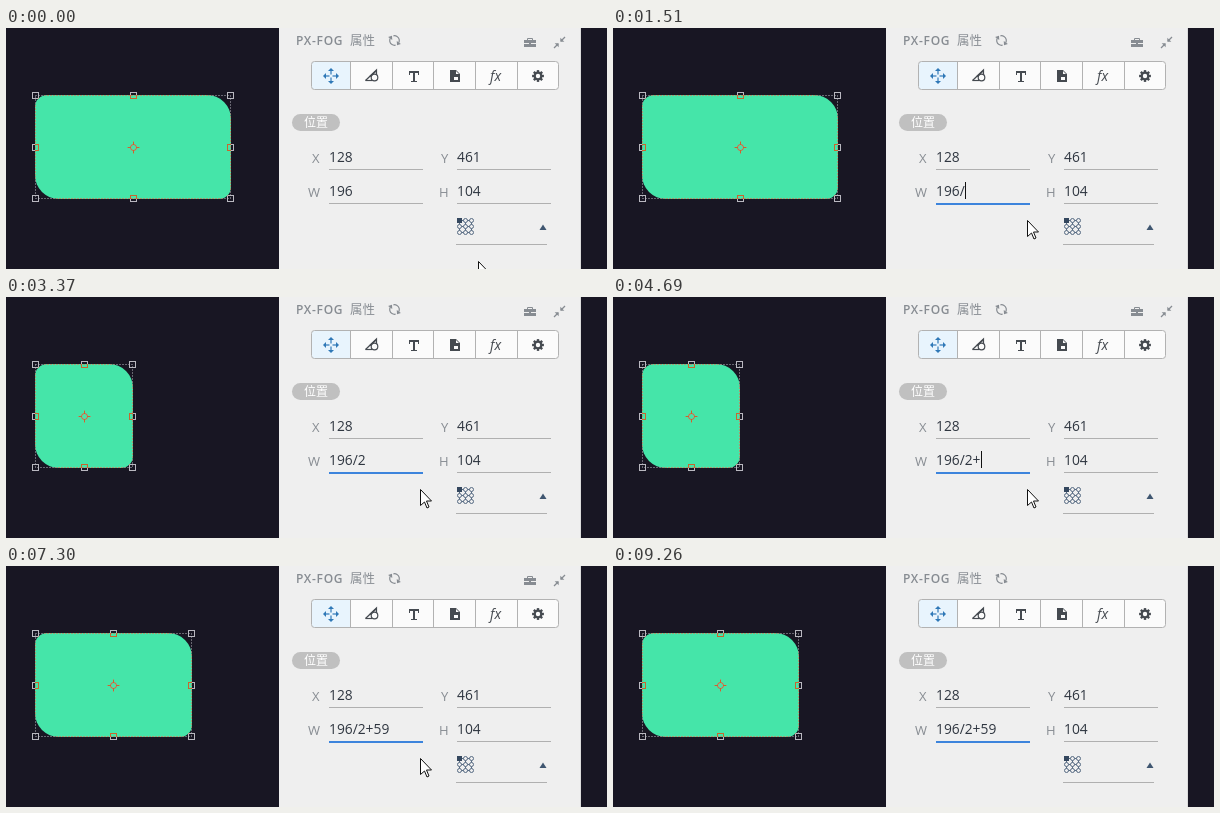
An HTML page with a canvas for the animation above (9.38 s loop, 601 by 241 pixels).

```html
<!DOCTYPE html>
<html lang="zh">
<head>
<meta charset="utf-8">
<title>Properties panel</title>
<style>
html, body { margin: 0; width: 100%; height: 100%; overflow: hidden; background: #181623; }
canvas { display: block; }
</style>
</head>
<body>
<canvas id="stage" width="601" height="241"></canvas>
<script>
const ctx = document.getElementById('stage').getContext('2d');
const LOOP = 9380, TICK = 107.7;
const FOCUS = 960, LEAVE = 9260;
const SETTLE = 880, REDRAW = 400, BLINK = 500;
const SANS = '"Open Sans", "Noto Sans", sans-serif';
const CJK = '"Noto Sans CJK SC", "Noto Sans CJK", sans-serif';
const PANEL = '#efefef', ORANGE = '#c9662f', LIGHT = '#b9b8c0';
const ICON = '#454a50', GREY = '#878c92', RULE = '#b0b0b0', SLATE = '#566a82';

const keys = [[1510, '/'], [1960, '2'], [3810, '+'], [5460, '5'], [5790, '9']];
const path = [[0, 472, 233], [750, 352, 163], [1300, 414, 192], [8400, 414, 192], [LEAVE, 588, 222]];

// The field is evaluated once typing has paused
const settles = keys.map(([time]) => time + SETTLE)
  .filter((time, i) => i === keys.length - 1 || time < keys[i + 1][0]);
const wakes = [FOCUS, ...keys.map(([time]) => time), ...settles].sort((a, b) => a - b);

const typedAt = t => '196' + keys.filter(([time]) => time <= t).map(([, ch]) => ch).join('');
const quotient = term => term.split('/').reduce((a, b) => a / b);
const calc = str => str.split('+').reduce((sum, term) => sum + Number(quotient(term)), 0);

function widthAt(t) {
  const done = settles.filter(time => time <= t).map(typedAt).filter(str => /\d$/.test(str));
  return done.length ? calc(done.pop()) : 196;
}

function caretOn(t) {
  const last = wakes.filter(time => time <= t).pop();
  return last !== undefined && Math.floor((t - last) / BLINK) % 2 === 0;
}

// The pointer moves once per tick
function pointerAt(t) {
  const now = Math.floor((t + 10) / TICK) * TICK;
  const i = path.findIndex(([time]) => time > now);
  if (i < 0) return null;
  const [t0, x0, y0] = path[i - 1], [t1, x1, y1] = path[i];
  const u = (now - t0) / (t1 - t0);
  const k = t < FOCUS + SETTLE ? 1 - (1 - u) ** 2 : u;
  return [Math.round(x0 + (x1 - x0) * k), Math.round(y0 + (y1 - y0) * k)];
}

function rect(x, y, w, h, color) {
  ctx.fillStyle = color;
  ctx.fillRect(x, y, w, h);
}

function text(str, x, y, font, color, spacing = 0) {
  ctx.font = font;
  ctx.letterSpacing = spacing + 'px';
  ctx.fillStyle = color;
  ctx.fillText(str, x, y);
  return ctx.measureText(str).width;
}

function trace(points, close) {
  ctx.beginPath();
  points.forEach(([x, y]) => ctx.lineTo(x, y));
  if (close) ctx.closePath();
}

function poly(points, color) {
  trace(points, true);
  ctx.fillStyle = color;
  ctx.fill();
}

function line(points, color, width = 1, close = false) {
  trace(points, close);
  ctx.strokeStyle = color;
  ctx.lineWidth = width;
  ctx.stroke();
}

function ring(x, y, r, color, width = 1, from = 0, to = Math.PI * 2) {
  ctx.beginPath();
  ctx.arc(x, y, r, from, to);
  ctx.strokeStyle = color;
  ctx.lineWidth = width;
  ctx.stroke();
}

// Repeats a drawing n times around a centre
function spin(x, y, n, draw, turn = 0) {
  for (let i = 0; i < n; i++) {
    ctx.save();
    ctx.translate(x, y);
    ctx.rotate(turn + i * 2 * Math.PI / n);
    draw();
    ctx.restore();
  }
}

function selection(w, color) {
  const xs = [29.5, 29.5 + Math.floor(w / 2), 28.5 + w], ys = [67.5, 119.5, 170.5];
  ctx.strokeStyle = color;
  ctx.lineWidth = 1;
  ctx.setLineDash([1, 2]);
  ctx.strokeRect(xs[0], ys[0], w - 1, 103);
  ctx.setLineDash([]);
  for (const x of xs) {
    for (const y of ys) {
      if (x !== xs[1] || y !== ys[1]) ctx.strokeRect(x - 3, y - 3, 6, 6);
    }
  }
  ring(xs[1], ys[1], 3, color);
  spin(xs[1], ys[1], 4, () => line([[2.5, 0], [6, 0]], color));
}

// The selection changes colour wherever it lies over the shape
function artwork(t) {
  const shape = new Path2D();
  shape.roundRect(29, 67, widthAt(t - REDRAW), 104, [12, 24, 12, 24]);
  ctx.fillStyle = '#45e5a9';
  ctx.fill(shape);
  selection(widthAt(t), LIGHT);
  ctx.save();
  ctx.clip(shape);
  selection(widthAt(t), ORANGE);
  ctx.restore();
}

function moveIcon(x, y) {
  const blue = '#2f78b7';
  spin(x, y, 4, () => {
    line([[1.5, 0], [5.5, 0]], blue, 1.2);
    poly([[8, 0], [5, -3], [5, 3]], blue);
  });
}

function shapeIcon(x, y) {
  line([[x - 6.5, y + 4.5], [x + 4.5, y - 6], [x + 4.5, y - 1]], ICON, 1.2);
  line([[x - 6.5, y + 4.5], [x, y + 4.5]], ICON, 1.2);
  line([[x - 2, y + 0.5], [x + 4, y - 5]], ICON, 1.6);
  ring(x + 2.5, y + 1.5, 3.3, ICON, 1.2);
}

function typeIcon(x, y) {
  rect(x - 5, y - 5, 10, 2, ICON);
  rect(x - 5, y - 5, 1, 4, ICON);
  rect(x + 4, y - 5, 1, 4, ICON);
  rect(x - 1, y - 5, 2, 11, ICON);
  rect(x - 3, y + 5, 6, 1, ICON);
}

function fileIcon(x, y) {
  poly([[x - 5, y - 6], [x + 1, y - 6], [x + 5, y - 2], [x + 5, y + 6], [x - 5, y + 6]], ICON);
  poly([[x + 1, y - 5], [x + 1, y - 2], [x + 4, y - 2]], '#fbfbfb');
  rect(x - 1, y + 1, 4, 3, '#fbfbfb');
}

function effectIcon(x, y) {
  text('fx', x - 6, y + 5, 'italic 14px ' + SANS, ICON);
}

function gearIcon(x, y) {
  spin(x, y, 8, () => rect(3, -1.2, 2.9, 2.4, ICON));
  ring(x, y, 3.3, ICON, 2.2);
}

function toolbar() {
  ctx.beginPath();
  ctx.roundRect(305.5, 33.5, 247, 28, 3);
  ctx.fillStyle = '#fbfbfb';
  ctx.fill();
  rect(306, 34, 38, 27, '#e8f4fd');
  ctx.strokeStyle = '#b2b2b2';
  ctx.lineWidth = 1;
  ctx.stroke();
  [moveIcon, shapeIcon, typeIcon, fileIcon, effectIcon, gearIcon].forEach((icon, i) => {
    if (i) rect(Math.floor(303 + 41.6 * i), 34, 1, 27, '#b2b2b2');
    icon(Math.round(325 + 41.3 * i), 48);
  });
}

function header(t) {
  text('PX-FOG', 290, 17, '600 12px ' + SANS, GREY, 0.7);
  text('属性', 344, 17, '500 12.5px ' + CJK, GREY);
  spin(388.5, 12.5, 2, () => {
    ring(0, 0, 4.8, GREY, 1.2, -2.4, -0.1);
    poly([[2.2, -0.8], [7.2, -0.8], [4.7, 2.4]], GREY);
  }, 0.6);
  if (t >= LEAVE) return;

  rect(518, 12, 12, 7, GREY);
  rect(518, 15, 12, 1, PANEL);
  rect(523, 14, 2, 3, GREY);
  line([[521.5, 12], [521.5, 10.5], [526.5, 10.5], [526.5, 12]], GREY);
  spin(553.5, 14.5, 2, () => {
    line([[1.5, -1.5], [5.5, -5.5]], GREY, 1.2);
    poly([[0.8, -0.8], [0.8, -4.8], [4.8, -0.8]], GREY);
  });
}

function anchorPicker() {
  for (let i = 0; i < 9; i++) {
    const x = 453.5 + i % 3 * 6, y = 192.5 + Math.floor(i / 3) * 6;
    if (i % 3 < 2) rect(x + 2, y - 0.5, 2, 1, SLATE);
    if (i < 6) rect(x - 0.5, y + 2, 1, 2, SLATE);
    if (i) ring(x, y, 2, SLATE);
    else rect(451, 190, 5, 5, '#34475e');
  }
  poly([[533.5, 202], [537, 196.5], [540.5, 202]], '#3f5670');
  rect(450, 216, 91, 1, RULE);
}

// Returns the x at which the value ends
function field(label, labelX, str, x, y) {
  text(label, labelX, y + 1, '13px ' + SANS, GREY);
  rect(x, y + 7, 94, 1, RULE);
  return x + text(str, x, y, '13.8px ' + SANS, '#2f3640');
}

function panel(t) {
  rect(273, 0, 302, 241, PANEL);
  rect(574, 0, 1, 241, '#dcdcdc');
  header(t);
  toolbar();

  ctx.beginPath();
  ctx.roundRect(286, 86, 48, 17, 8.5);
  ctx.fillStyle = '#c0c0c0';
  ctx.fill();
  text('位置', 298, 99, '12px ' + CJK, '#fff');

  field('X', 306, '128', 323, 134);
  field('Y', 435, '461', 451, 134);
  field('H', 433, '104', 451, 168);
  const end = field('W', 302, typedAt(t), 323, 168);
  ctx.globalAlpha = Math.min(1, Math.max(0, (t - FOCUS) / 300));
  rect(323, 175, 94, 2, '#3c84dc');
  ctx.globalAlpha = 1;
  if (caretOn(t)) rect(Math.round(end), 154, 1, 17, '#111');
  anchorPicker();
}

function cursor(t) {
  const tip = pointerAt(t);
  if (!tip) return;
  const [x, y] = tip;
  ctx.save();
  ctx.translate(x + 0.5, y + 0.5);
  if (y < 174) {
    line([[0, -7], [0, 7]], '#222');
    for (const d of [-7, 7]) line([[-3, d], [3, d]], '#222');
  } else {
    const arrow = [[0, 0], [0, 16], [4, 12.5], [6.5, 18.5], [8.5, 17.5], [6, 11.5], [11, 11.5]];
    poly(arrow, '#fff');
    line(arrow, '#111', 1, true);
  }
  ctx.restore();
}

function draw(now) {
  const t = now % LOOP;
  rect(0, 0, 601, 241, '#181623');
  artwork(t);
  panel(t);
  cursor(t);
}

let start;
function frame(now) {
  start ??= now;
  draw(now - start);
  requestAnimationFrame(frame);
}
draw(0);
requestAnimationFrame(frame);
</script>
</body>
</html>
```
